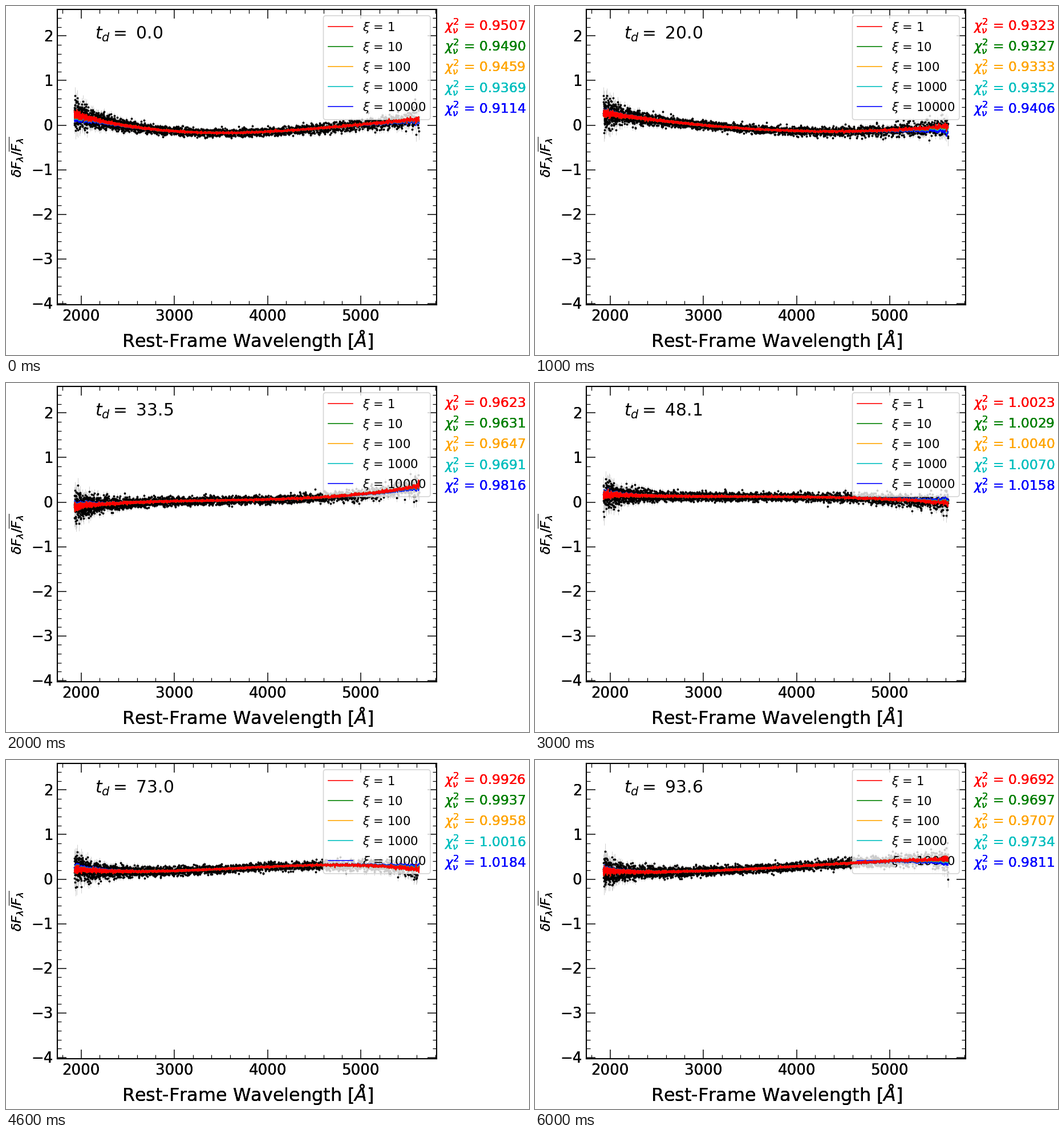
Animation, 917 px wide and 611 px high, one loop 6.2 s. Source, as a matplotlib script:

```python
import numpy as np
import matplotlib.pyplot as plt
from matplotlib.animation import FuncAnimation
from matplotlib.collections import LineCollection
from matplotlib.lines import Line2D
from matplotlib.patches import FancyBboxPatch
from matplotlib.ticker import AutoMinorLocator, MultipleLocator
from matplotlib.transforms import Affine2D

W, H, DPI = 917, 611, 64
FRAMES, STEP = 31, 200
LEFT, RIGHT, TOP, BOTTOM = 90, 754.5, 6, 522.5
X0, X_UNIT, Y0, Y_UNIT = 131.5, .1635, 208.5, 78.1  # pixels at 2000 and at 0
COLORS = ["r", "g", "orange", "c", "b"]


def track(*values):
    """A value over time, linear between the key epochs."""
    keys = [0, 5, 10, 15, 18, 23, 30]
    return lambda i: np.interp(i, keys, values)


delay_days = track(0, 20, 33.5, 48.1, 58.4, 73, 93.6)
chi_first = track(.9507, .9323, .9623, 1.0023, .9355, .9926, .9692)
chi_gap = track(-.0393, .0083, .0193, .0135, .0377, .0258, .0119)

# The continuum is a cubic through four moving anchors.
ANCHORS = [1930, 2800, 4500, 5620]
anchor_levels = [
    track(.24, .27, -.10, .17, .55, .22, .18),
    track(-.10, .04, .01, .13, .15, .175, .17),
    track(-.08, -.14, .10, .10, .11, .31, .35),
    track(.13, -.02, .36, -.02, .03, .22, .45),
]

wave = np.geomspace(1930, 5625, 3200)
from_left, from_right = wave - 1930, 5625 - wave
sigma = (.041 + .11 * np.exp(-from_left / 120) + .03 * np.exp(-from_left / 600)
         + .035 * ((wave - 3300) / 2000) ** 2 + .10 * np.exp(-from_right / 50))


def scaled(x):
    return (np.asarray(x) - 3775) / 1850


def continuum(i):
    levels = [level(i) for level in anchor_levels]
    return np.polyval(np.polyfit(scaled(ANCHORS), levels, 3), scaled(wave))


def share(k):
    """How far fit k departs from the first one, up to 1 for the last."""
    return .35 ** (4 - k) if k else 0


def pt(pixels):
    return pixels * 72 / DPI


fig = plt.figure(figsize=(W / DPI, H / DPI), dpi=DPI, facecolor="white")
ax = fig.add_axes([LEFT / W, 1 - BOTTOM / H, (RIGHT - LEFT) / W, (BOTTOM - TOP) / H])
page = Affine2D().scale(1 / W, -1 / H).translate(0, 1) + fig.transFigure


def label(x, y, s, size, passes=1, **kw):
    """Text at a pixel position; more passes give a denser stroke."""
    return [ax.text(x, y, s, fontsize=pt(size), transform=page, **kw)
            for _ in range(passes)]


# Axes
ax.set_xlim(2000 + (LEFT - X0) / X_UNIT, 2000 + (RIGHT - X0) / X_UNIT)
ax.set_ylim((Y0 - BOTTOM) / Y_UNIT, (Y0 - TOP) / Y_UNIT)
ax.xaxis.set_major_locator(MultipleLocator(1000))
ax.yaxis.set_major_locator(MultipleLocator(1))
for axis in (ax.xaxis, ax.yaxis):
    axis.set_minor_locator(AutoMinorLocator(5))
ax.tick_params(which="both", direction="in", top=True, right=True,
               labelbottom=False, labelleft=False)
ax.tick_params(which="major", length=pt(16), width=pt(1.5))
ax.tick_params(which="minor", length=pt(7), width=pt(1.2))
for spine in ax.spines.values():
    spine.set_linewidth(pt(2.1))
for v in range(2000, 6000, 1000):
    label(X0 + (v - 2000) * X_UNIT, 551, str(v), 26, 3, ha="center")
for v in range(-4, 3):
    label(82.3, Y0 - v * Y_UNIT + 9.5, str(v).replace("-", "\u2212"), 26, 3, ha="right")
label(424, 597, "Rest-Frame Wavelength [$Å$]", 31.9, 3, ha="center")
label(28.5, 264, r"$\delta F_{\lambda}/\overline{F_{\lambda}}$", 23.4, 3,
      rotation=90, rotation_mode="anchor", ha="center")

# Data and fits
bars = ax.add_collection(LineCollection([], colors="0.82", linewidths=pt(1), zorder=1),
                         autolim=False)
dots, = ax.plot([], [], "ko", ms=pt(3.8), mew=0, zorder=2)
fits = [ax.plot([], [], color=c, lw=pt(2.1), zorder=15 - k)[0]
        for k, c in enumerate(COLORS)]

# Legend, above the data but below the fits
ax.add_patch(FancyBboxPatch((556.5, 17), 187.5, 182, transform=page, zorder=5,
                            boxstyle="round,pad=0,rounding_size=4.3", fc="white",
                            ec="0.8", lw=pt(1.7), alpha=.8))
for k, c in enumerate(COLORS):
    y = 36 + 35.1 * k
    ax.add_line(Line2D([564.5, 607.5], [y, y], color=c, lw=pt(1.6),
                       transform=page, zorder=6))
    label(625.3, y + 7.8, rf"$\xi$ = {10 ** k}", 21.3, zorder=6)

delay = label(156.5, 58.4, "", 29.7)
chis = [label(767.8, 42.5 + 36.15 * k, "", 23.4, 4, color=c)
        for k, c in enumerate(COLORS)]


def update(i):
    rng = np.random.default_rng(100 + i)
    mean = continuum(i)
    flux = mean + sigma * rng.standard_normal(wave.size)
    bars.set_segments(np.stack([np.column_stack([wave, flux - sigma]),
                                np.column_stack([wave, flux + sigma])], axis=1))
    dots.set_data(wave, flux)

    ripple = .24 * sigma * rng.standard_normal(wave.size)
    drift = (2 * chi_gap(i) * np.exp(-from_left / 250)
             - .12 * np.cos(2 * np.pi * (i - 5) / 28) * np.exp(-from_right / 300))
    for k, (fit, texts) in enumerate(zip(fits, chis)):
        fit.set_data(wave, mean + share(k) * drift + ripple)
        for t in texts:
            t.set_text(rf"$\chi^2_\nu$ = {chi_first(i) + share(k) * chi_gap(i):.4f}")
    delay[0].set_text(f"$t_d = $ {delay_days(i):.1f}")
    return [bars, dots, *delay, *fits]


anim = FuncAnimation(fig, update, frames=FRAMES, init_func=lambda: update(0),
                     interval=STEP, repeat=True, repeat_delay=0, blit=False)
plt.show()
```
